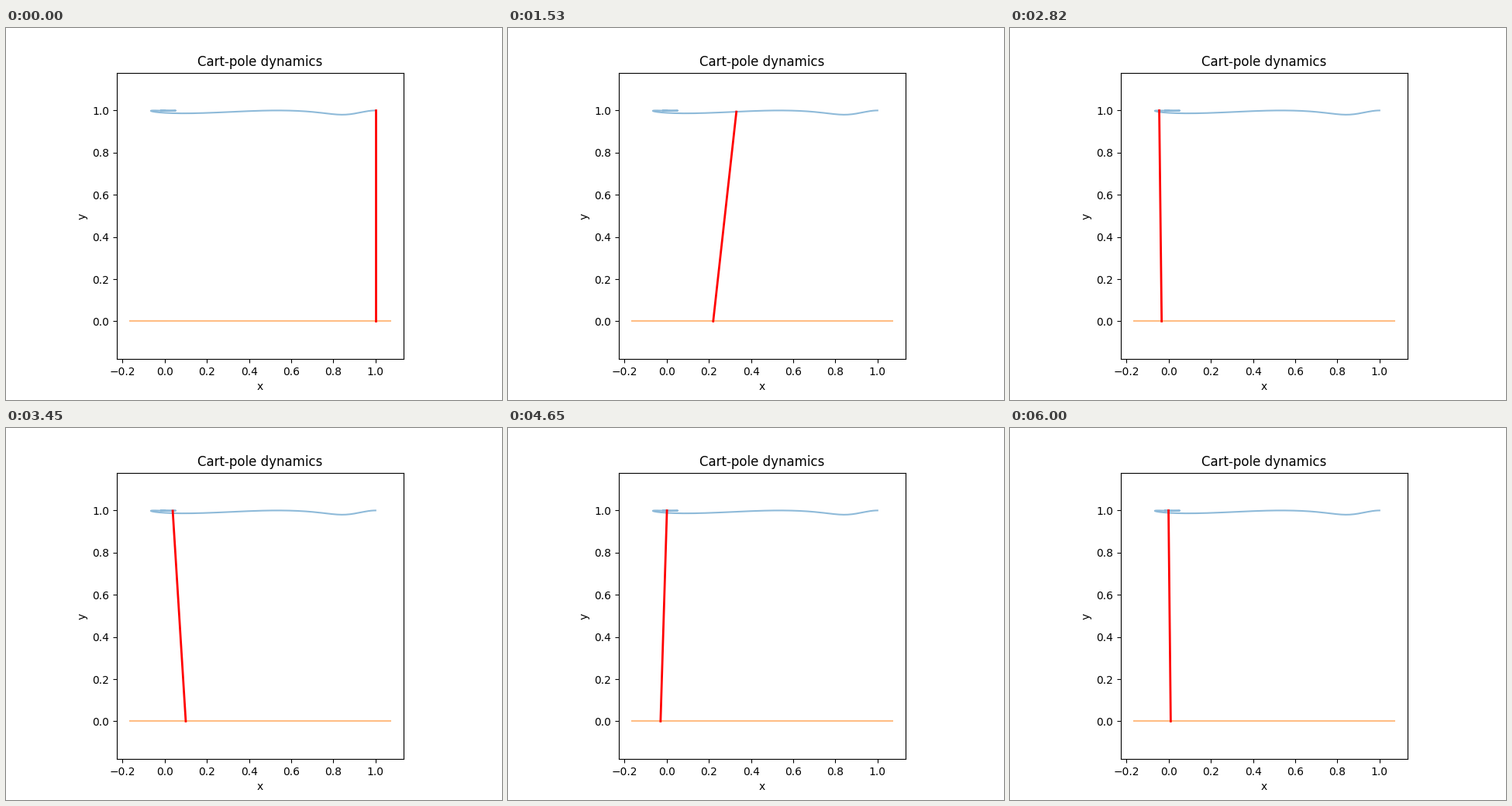
A matplotlib script for the animation above (6030 ms loop, 640 by 480 pixels).

```python
import numpy as np
import matplotlib.pyplot as plt
from matplotlib.animation import FuncAnimation

FRAMES = 201
INTERVAL = 30

# Key poses: step, cart position, sideways lean of the pole
POSES = [
    (0, 1, 0), (10, 1.053, -0.103), (21, 1.0484, -0.199),
    (34, 0.788, -0.104), (51, 0.2205, 0.110), (63, -0.0695, 0.165),
    (75, -0.1645, 0.125), (94, -0.0335, -0.0115), (112, 0.093, -0.064),
    (126, 0.089, -0.036), (147, -0.004, 0.023), (163, -0.040, 0.0275),
    (182, -0.0195, 0.002), (200, 0.0095, -0.0105),
]


def spline(k, v, t):
    """Cubic spline through (k, v), starting at rest with a natural end."""
    h = np.diff(k)
    d = np.diff(v) / h
    n = len(k)
    a, b = np.eye(n), np.zeros(n)
    for i in range(1, n - 1):
        a[i, i - 1:i + 2] = h[i], 2 * (h[i - 1] + h[i]), h[i - 1]
        b[i] = 3 * (h[i] * d[i - 1] + h[i - 1] * d[i])
    a[-1, -2:] = 1, 2
    b[-1] = 3 * d[-1]
    m = np.linalg.solve(a, b)

    i = np.clip(np.searchsorted(k, t, side="right") - 1, 0, n - 2)
    u = (t - k[i]) / h[i]
    ease = u ** 2 * (3 - 2 * u)
    bend = u * (1 - u) * (m[i] * (1 - u) - m[i + 1] * u)
    return v[i] + (v[i + 1] - v[i]) * ease + h[i] * bend


steps, carts, leans = np.array(POSES, float).T
t = np.arange(FRAMES)
cart = spline(steps, carts, t)
lean = spline(steps, leans, t)
tip_x = cart + lean
tip_y = np.sqrt(1 - lean ** 2)

fig, ax = plt.subplots(figsize=(6.4, 4.8), dpi=100)
ax.set_aspect("equal")
ax.set_xlim(-0.22647, 1.13235)
ax.set_ylim(-0.17941, 1.17941)
ax.set_title("Cart-pole dynamics")
ax.set_xlabel("x")
ax.set_ylabel("y")

ax.plot(tip_x, tip_y, color="C0", alpha=0.5)
ax.plot(cart, np.zeros(FRAMES), color="C1", alpha=0.5)
pole, = ax.plot([], [], color="red", lw=2)


def update(i):
    pole.set_data([cart[i], tip_x[i]], [0, tip_y[i]])
    return pole,


anim = FuncAnimation(fig, update, frames=FRAMES, interval=INTERVAL,
                     repeat=True, repeat_delay=0)
plt.show()
```
